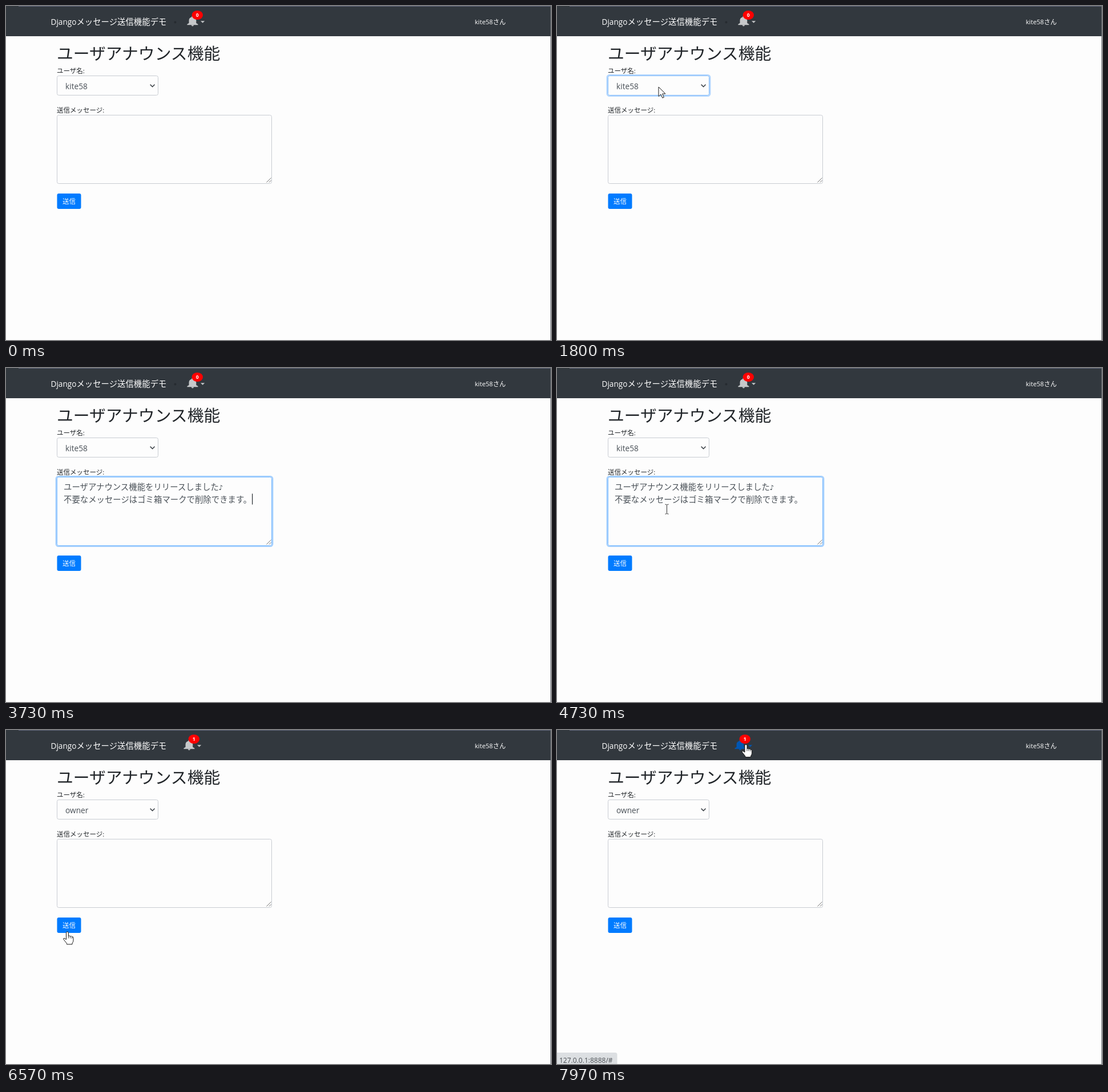
Animation of 955x586 px, one loop 8000 ms. Source, as an HTML page:

```html
<!DOCTYPE html>
<html lang="ja">
<head>
<meta charset="utf-8">
<title>メッセージ送信デモ</title>
<style>
html, body { margin: 0; width: 100%; height: 100%; overflow: hidden; background: #fdfdfd; }
svg { display: block; width: 955px; height: 586px; }
text { font-family: "Open Sans", "Noto Sans CJK JP", "Noto Sans CJK", sans-serif; font-size: 11.5px; fill: #212529; white-space: pre; }
.field { fill: #fdfdfd; stroke-width: 1; }
.ring { fill: none; stroke: #007bff; stroke-width: 2.4; }
.input { font-size: 14.4px; fill: #495057; }
.light { fill: #fff; }
.pointer { fill: #fff; stroke: #1b1b1b; stroke-width: 1; stroke-linejoin: round; }
</style>
</head>
<body>
<svg viewBox="0 0 955 586">
  <rect width="955" height="586" fill="#fdfdfd"/>
  <rect width="955" height="53" fill="#32383e"/>
  <rect x="22" width="933" height="1" fill="#62677c"/>
  <rect x="954" width="1" height="586" fill="#70747a"/>

  <text class="light" x="78.5" y="33" font-size="14.4"><tspan style="font-size:13.6px">Django</tspan><tspan style="font-size:14.4px">メッセージ送信機能デモ</tspan></text>
  <circle id="bullet" cx="296.5" cy="28.5" r="2" fill="#262b30"/>
  <g id="bell">
    <g id="link">
      <path transform="translate(314.2 15.2) scale(1.06 .92)" d="M12 22c1.1 0 2-.9 2-2h-4c0 1.1.9 2 2 2zM18 16v-5c0-3.1-1.6-5.6-4.5-6.3V4a1.5 1.5 0 0 0-3 0v.7C7.6 5.4 6 7.9 6 11v5l-3 2.3V19.5h18V18.300z"/>
      <path d="M341 26.200h7.200l-3.600 3.600z"/>
    </g>
    <ellipse cx="335.300" cy="16" rx="9.700" ry="8" fill="#f00"/>
    <text id="count" class="light" x="335.300" y="19.200" text-anchor="middle" style="font-size:8.600px;font-weight:700">0</text>
  </g>
  <text class="light" x="821.500" y="31.500" style="font-size:11.200px">kite58さん</text>

  <text x="89" y="93.500" style="font-size:28.800px">ユーザアナウンス機能</text>
  <text x="89" y="118">ユーザ名:</text>
  <rect id="pickRing" class="ring" x="87.800" y="121.300" width="180.400" height="36.400" rx="4"/>
  <rect id="pick" class="field" x="89.500" y="122.500" width="177" height="34" rx="3"/>
  <text id="name" class="input" x="104" y="146" style="font-size:13.700px"></text>
  <path d="M252.700 137.800l3.900 4 3.900-4" fill="none" stroke="#343a40" stroke-width="1.500"/>

  <text x="89" y="187">送信メッセージ:</text>
  <rect id="areaRing" class="ring" x="87.800" y="190.300" width="379.400" height="122.400" rx="4"/>
  <rect id="area" class="field" x="89.500" y="191.500" width="376" height="120" rx="3"/>
  <path d="M456.500 309.500l8-8M461 309.500l3.500-3.500" stroke="#777" stroke-width="1"/>
  <g id="message">
    <text class="input" x="101" y="213.700">ユーザアナウンス機能をリリースしました<tspan style="font-family:'DejaVu Sans',sans-serif;font-size:12px">♪</tspan></text>
    <text class="input" x="101" y="235.500">不要なメッセージはゴミ箱マークで削除できます。</text>
  </g>
  <rect id="caret" width="1.300" height="19" fill="#33383d"/>

  <rect id="sendRing" class="ring" x="88.500" y="328" width="44" height="29" rx="4"/>
  <rect id="send" x="89.500" y="329" width="42" height="27" rx="3"/>
  <text class="light" x="110.500" y="346.700" text-anchor="middle">送信</text>

  <g id="status">
    <path d="M0 566H102q3.500 0 3.500 3.500V586H0z" fill="#dcdfe2"/>
    <text x="4" y="583.500" style="font-size:12px;fill:#4a4e53">127.0.0.1:8888/#</text>
  </g>

  <path id="arrow" class="pointer" d="M0 0V16.500L4 13L6.800 19.300L9.400 18.200L6.700 12H12Z"/>
  <path id="beam" d="M-3-8.500Q0-8.500 0-7Q0-8.500 3-8.500M0-7V7M-3 8.500Q0 8.500 0 7Q0 8.500 3 8.500" fill="none" stroke="#333" stroke-width="1"/>
  <g id="hand">
    <path class="pointer" d="M-2 1.800Q-2 0 0 0T2 1.800V7.500Q4 6.300 5 8Q7 6.900 8 8.800Q10.500 8 10.500 11V15Q10.500 18 8.500 20V22H-1V20.500L-6.500 13.500Q-7.500 11.500-5.500 11.300L-2 13.500Z"/>
    <path d="M2 7.500v4M5 8v3.500M8 9v3" stroke="#1b1b1b" stroke-width=".8"/>
  </g>
</svg>
<script>
const LOOP = 8000, RELOAD = 6300;
const el = id => document.getElementById(id);
const clamp = v => Math.max(0, Math.min(1, v));
const ease = v => v * v * (3 - 2 * v);
const within = (t, a, b) => t >= a && t < b;
const show = (id, on) => el(id).setAttribute('visibility', on ? 'visible' : 'hidden');
const paint = (id, color) => el(id).setAttribute('fill', color);

// Pointer moves: start, end, from, to
const moves = [
  [830, 1330, [330, 600], [178, 142]],
  [2270, 2700, [178, 165], [205, 232]],
  [4630, 5080, [205, 232], [107.500, 354]],
  [7130, 7800, [107.500, 354], [331, 25.500]]
];

function pointerAt(t) {
  const [a, b, p, q] = moves.filter(m => t >= m[0]).pop() || moves[0];
  const k = ease(clamp((t - a) / (b - a)));
  return p.map((v, i) => v + (q[i] - v) * k);
}

function pointerKind(t, x, y) {
  if (t < 830 || within(t, 2100, 2270) || within(t, 3600, 4630)) return '';
  if (x > 318 && y < 40) return 'hand';
  if (x < 132 && y > 329 && y < 357) return 'hand';
  if (x > 89 && x < 466 && y > 191 && y < 312) return 'beam';
  return 'arrow';
}

// Focus fades in and out over 150 ms
const focus = (t, a, b) => clamp((t - a) / 150) * clamp((b - t) / 150 + 1) * (t < RELOAD ? 1 : 0);

function setFocus(id, k) {
  el(id + 'Ring').setAttribute('opacity', .35 * k);
  const mix = (from, to) => Math.round(from + (to - from) * k);
  el(id).setAttribute('stroke', `rgb(${mix(200, 128)},${mix(204, 189)},${mix(210, 255)})`);
}

function render(t) {
  const loaded = t >= RELOAD;
  const typed = within(t, 3600, RELOAD);
  const [x, y] = pointerAt(t);
  const kind = pointerKind(t, x, y);
  const onBell = t > 7000 && kind === 'hand' && y < 40;
  const onSend = within(t, 5000, RELOAD) && kind === 'hand';

  el('name').textContent = loaded ? 'owner' : 'kite58';
  el('count').textContent = loaded ? '1' : '0';
  el('bell').setAttribute('transform', `translate(${loaded ? -6 : 0} 0)`);
  show('bullet', !loaded);
  paint('link', onBell ? '#0056b3' : '#c6c8ca');
  show('status', onBell);

  setFocus('pick', focus(t, 1670, 2750));
  setFocus('area', focus(t, 2750, 5680));
  el('sendRing').setAttribute('opacity', .4 * focus(t, 5680, RELOAD));
  paint('send', onSend ? '#0062cc' : '#007bff');

  show('message', typed);
  show('caret', within(t, 2770, 3270) || within(t, 3600, 4300) || within(t, 4800, 5330));
  el('caret').setAttribute('x', typed ? 431 : 101);
  el('caret').setAttribute('y', typed ? 220.500 : 198.500);

  for (const id of ['arrow', 'beam', 'hand']) {
    show(id, id === kind);
    el(id).setAttribute('transform', `translate(${x.toFixed(1)} ${y.toFixed(1)})`);
  }
}

const start = performance.now();
function tick() {
  render((performance.now() - start) % LOOP);
  requestAnimationFrame(tick);
}
tick();
</script>
</body>
</html>
```
